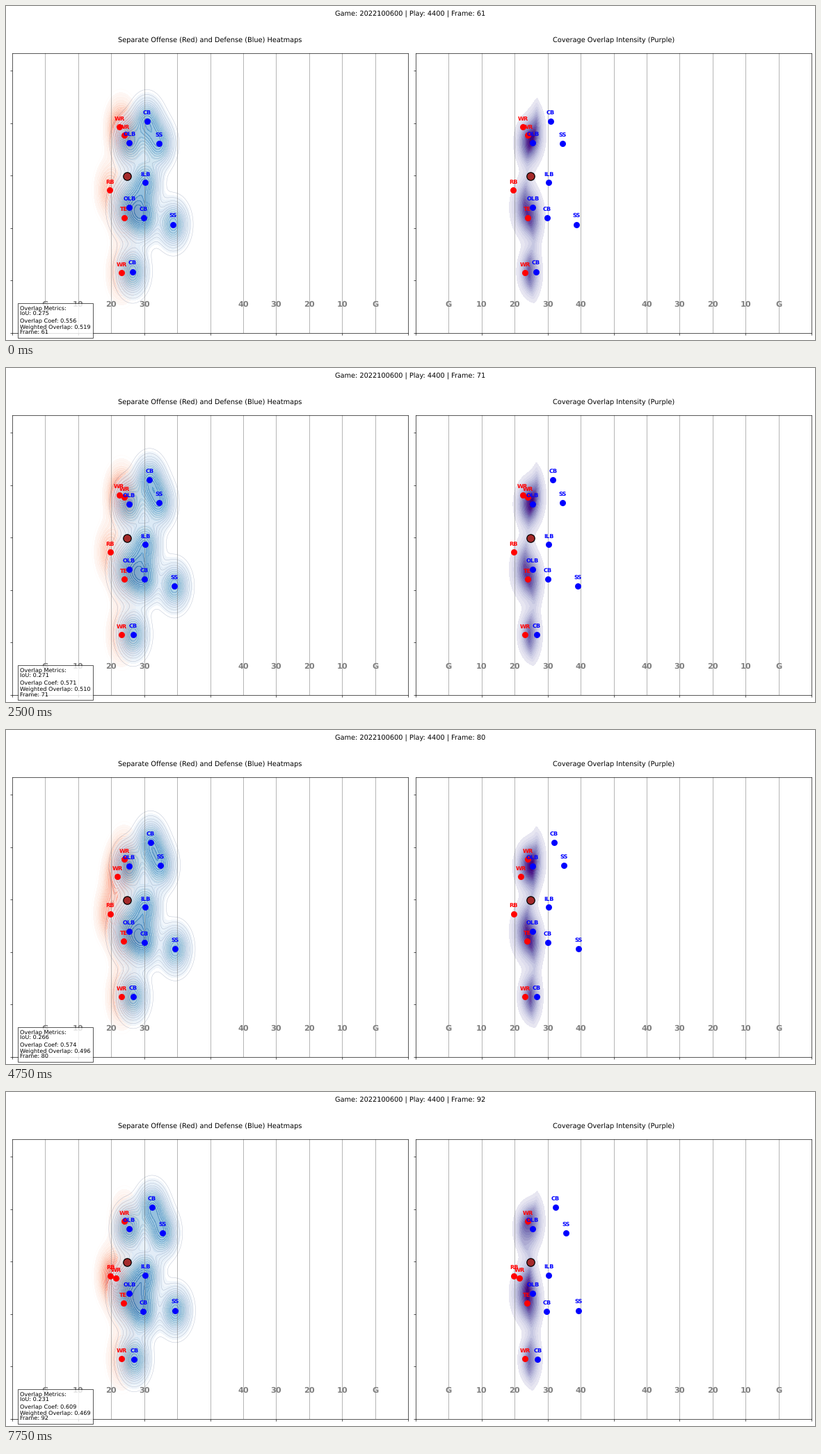
Write a matplotlib script that moves like this. It is 1163 px wide and 481 px high and loops after 8000 ms.

```python
import numpy as np
import matplotlib.pyplot as plt
from matplotlib.animation import FuncAnimation

plt.rcParams.update({"font.family": "DejaVu Sans", "text.hinting": "none"})

W, H, DPI = 1163, 481, 58.15
FRAMES, INTERVAL, FIRST = 32, 250, 61

# Knots along each path: (frame, x, y) in yards.
OFFENSE = [
    ("WR", [(0, 32.58, 39.24), (7, 32.58, 38.92), (13, 32.22, 37.39), (17, 31.95, 35.51),
            (22, 31.63, 32.57), (27, 31.42, 29.39), (31, 31.42, 26.8)]),
    ("WR", [(0, 34.02, 37.72)]),
    ("RB", [(0, 29.59, 27.25), (31, 29.74, 27.31)]),
    ("TE", [(0, 33.91, 22.01), (31, 33.74, 22.09)]),
    ("WR", [(0, 33.17, 11.5)]),
]
DEFENSE = [
    ("CB", [(0, 40.81, 40.34), (7, 41.44, 40.87), (13, 41.76, 41.0), (22, 42.03, 40.76),
            (31, 42.39, 40.3)]),
    ("SS", [(0, 44.5, 36.07), (7, 44.5, 36.5), (13, 44.64, 36.68), (17, 44.77, 36.6),
            (22, 45.02, 36.28), (31, 45.5, 35.45)]),
    ("ILB", [(0, 40.34, 28.7), (17, 40.34, 28.66), (22, 40.32, 28.5), (27, 40.32, 28.08),
             (31, 40.32, 27.44)]),
    ("OLB", [(0, 35.53, 36.28), (7, 35.53, 36.37), (17, 35.28, 36.37), (22, 35.4, 36.28)]),
    ("OLB", [(0, 35.53, 23.94), (7, 35.38, 24.0), (13, 35.53, 23.83), (22, 35.43, 23.94),
             (31, 35.53, 23.94)]),
    ("CB", [(0, 39.86, 21.95), (7, 39.96, 22.09), (13, 40.07, 22.09), (22, 39.96, 21.69),
            (27, 39.86, 21.23), (31, 39.7, 20.46)]),
    ("SS", [(0, 48.82, 20.69), (7, 49.09, 20.77), (13, 49.3, 20.69), (22, 49.45, 20.53),
            (31, 49.45, 20.69)]),
    ("CB", [(0, 36.48, 11.7), (7, 36.63, 11.5), (22, 36.63, 11.5), (31, 36.97, 11.33)]),
]
METRIC_KEYS = [0, 7, 13, 17, 22, 27, 31]
METRICS = {
    "IoU": [.275, .277, .264, .272, .257, .252, .231],
    "Overlap Coef": [.556, .602, .540, .540, .625, .635, .609],
    "Weighted Overlap": [.519, .518, .503, .508, .479, .494, .469],
}
BALL = (34.84, 29.85)
OFF_SIGMA, DEF_SIGMA = (2.5, 3.15), (2.65, 2.65)
DEF_SPREAD = [1, 1, 1, 1, 1.2, 1, 1, 1]

GX, GY = np.meshgrid(np.linspace(20, 60, 161), np.linspace(0, 53.3, 161))
FILL_LEVELS = np.linspace(.08, 1.001, 17)
LINE_LEVELS = np.linspace(.05, 1, 18)


def positions(team, i):
    points = []
    for _, path in team:
        t, x, y = zip(*path)
        points.append((np.interp(i, t, x), np.interp(i, t, y)))
    return np.array(points)


def density(points, sigma, spread):
    field = sum(np.exp(-((GX - x) / (sigma[0] * k)) ** 2 / 2
                       - ((GY - y) / (sigma[1] * k)) ** 2 / 2)
                for (x, y), k in zip(points, spread))
    return field / field.max()


def make_field(left, title, skipped):
    ax = fig.add_axes([left / W, (H - 471) / H, 569 / W, 403 / H])
    ax.set(xlim=(0, 120), ylim=(0, 53.3), xticks=range(0, 121, 20), yticks=range(0, 51, 10))
    ax.tick_params(labelbottom=False, labelleft=False)
    ax.set_title(title, pad=20, fontsize=12)
    for x in range(10, 111, 10):
        ax.axvline(x, color="gray", lw=1, alpha=.7)
        if x not in skipped:
            yards = min(x, 120 - x) - 10
            ax.text(x, 5, str(yards) if yards else "G", color="gray", fontsize=14,
                    weight="bold", ha="center", va="baseline")
    return ax


def add_team(ax, team, color):
    dots = ax.scatter([0] * len(team), [0] * len(team), s=100, c=color, zorder=5)
    labels = [ax.text(0, 0, role, color=color, fontsize=10, weight="bold",
                      ha="center", va="bottom", zorder=5) for role, _ in team]
    return dots, labels


def place(group, points):
    dots, labels = group
    dots.set_offsets(points)
    for label, (x, y) in zip(labels, points):
        label.set_position((x, y + 1))


fig = plt.figure(figsize=((W + .01) / DPI, (H + .01) / DPI), dpi=DPI, facecolor="white")
heading = fig.text(.5, 1 - 14.2 / H, "", fontsize=12, ha="center", va="baseline")
heat_ax = make_field(9, "Separate Offense (Red) and Defense (Blue) Heatmaps", (50, 60))
overlap_ax = make_field(589, "Coverage Overlap Intensity (Purple)", (60,))

groups = []
for ax in (heat_ax, overlap_ax):
    groups.append((add_team(ax, OFFENSE, "red"), add_team(ax, DEFENSE, "blue")))
    ax.scatter(*BALL, s=200, c="brown", edgecolors="black", linewidths=1.5, zorder=5)

metrics_box = heat_ax.text(.02, -3.7 / 403, "", transform=heat_ax.transAxes, fontsize=10,
                           va="bottom", zorder=6, bbox=dict(facecolor="white", alpha=.8))
contours = []


def draw_heat(field, fill, lines):
    contours.append(heat_ax.contourf(GX, GY, field, FILL_LEVELS, vmin=0, zorder=1, **fill))
    contours.append(heat_ax.contour(GX, GY, field, LINE_LEVELS, linewidths=.6,
                                    zorder=1, **lines))


def update(i):
    while contours:
        contours.pop().remove()
    off, dfn = positions(OFFENSE, i), positions(DEFENSE, i)
    red = density(off, OFF_SIGMA, [1] * len(off))
    blue = density(dfn, DEF_SIGMA, DEF_SPREAD)
    draw_heat(red, dict(cmap="Reds", vmax=1.6, alpha=.35), dict(cmap="Reds", alpha=.5))
    draw_heat(blue, dict(cmap="Blues", vmax=1.25, alpha=.55),
              dict(colors="#1f3a6f", alpha=.3))

    shared = np.minimum(red, blue)
    shared /= shared.max()
    contours.append(overlap_ax.contourf(GX, GY, shared, FILL_LEVELS, cmap="Purples",
                                        vmin=-.08, vmax=1, zorder=1))
    for offense, defense in groups:
        place(offense, off)
        place(defense, dfn)

    number = FIRST + i
    heading.set_text(f"Game: 2022100600 | Play: 4400 | Frame: {number}")
    rows = [f"{name}: {np.interp(i, METRIC_KEYS, values):.3f}"
            for name, values in METRICS.items()]
    metrics_box.set_text("\n".join(["Overlap Metrics:", *rows, f"Frame: {number}"]))


anim = FuncAnimation(fig, update, frames=FRAMES, interval=INTERVAL, repeat=True,
                     repeat_delay=0, init_func=lambda: update(0))
plt.show()
```
